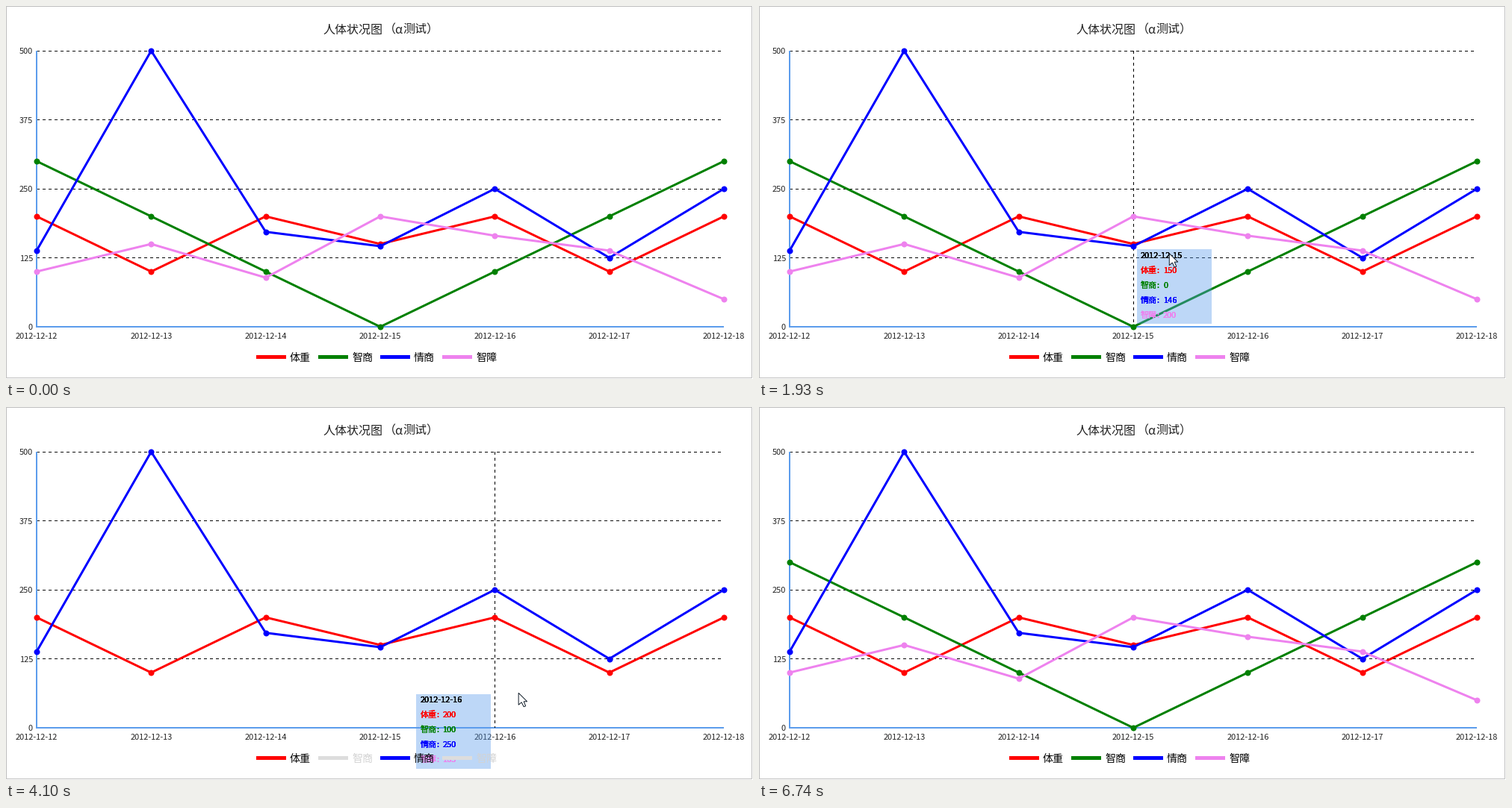
A matplotlib script for the animation above (7.08 s loop, 1000x500 px).

```python
import numpy as np
import matplotlib.pyplot as plt
from matplotlib.animation import FuncAnimation
from matplotlib.patches import Polygon, Rectangle

W, H, DPI = 1000, 500, 100
LOOP, STEP = 7080, 30
PT = 72 / DPI
LEFT, RIGHT, TOP, BOTTOM = 41, 961, 60, 430
ITEM_X, ITEM_GAP, ITEM_Y = 335, 83, 470.5
AXIS, PALE, INK = "#5c9cec", "#dddddd", "#14202c"
FONT = "Noto Sans CJK JP"

days = [f"2012-12-{d}" for d in range(12, 19)]
day_x = np.linspace(LEFT, RIGHT, 7)
series = [
    ("体重", "red", [200, 100, 200, 150, 200, 100, 200]),
    ("智商", "green", [300, 200, 100, 0, 100, 200, 300]),
    ("情商", "blue", [138, 500, 172, 146, 250, 125, 250]),
    ("智障", "violet", [100, 150, 89, 200, 165, 138, 50]),
]


def item(k):
    """Pointer spot on a legend entry."""
    return ITEM_X + ITEM_GAP * k + 18, 472


# pointer moves: start, end, destination; it rests in between
ENTRY = (222, 490)
moves = [
    (190, 390, (327, 235)),
    (710, 1250, (682, 150)),
    (1410, 1449, (649, 188)),
    (1449, 1929, (554, 326)),
    (1929, 2090, (427, 477)),
    (2190, 2520, item(1)),
    (2700, 3190, (647, 482)),
    (3310, 3410, (635, 476)),
    (3560, 3850, (655, 395)),
    (4050, 4300, (828, 330)),
    (4300, 4610, item(3)),
    (4910, 5320, item(1)),
    (6220, 6730, (219, 500)),
]
HIDDEN = {1: (2700, 5750), 3: (3560, 4910)}
TIP_OFF = 4520
LAG = 6

fig = plt.figure(figsize=(W / DPI, H / DPI), dpi=DPI, facecolor="white")
ax = fig.add_axes([0, 0, 1, 1])
ax.set_xlim(0, W)
ax.set_ylim(H, 0)
ax.axis("off")


def value_y(v):
    return BOTTOM - np.asarray(v) * (BOTTOM - TOP) / 500


def label(x, y, s, px, color="#222222", ha="left", z=1):
    """Text whose middle height is y."""
    return ax.text(x, y + 0.37 * px, s, fontsize=px * PT, color=color, ha=ha,
                   va="baseline", family=FONT, zorder=z)


def stroke(xs, ys, color, px, z, **kw):
    kw.setdefault("solid_capstyle", "butt")
    return ax.plot(xs, ys, color=color, lw=px * PT, zorder=z, snap=False,
                   **kw)[0]


def crisp(v):
    """Centre of the pixel that holds v."""
    return np.floor(v) + 0.5


def dashed(xs, ys, z):
    return stroke(xs, ys, "black", 1, z, dashes=(4, 4), dash_capstyle="butt")


# border, title, grid and axes
ax.add_patch(Rectangle((0.5, 0.5), 998, 498, fill=False, ec="#bebebe",
                       lw=PT, zorder=9, snap=False))
label(424, 31, "人体状况图", 16)
label(506, 31, "（", 16)
label(525.5, 31, "α", 16, ha="center")
label(531, 31, "测试）", 16)
for v in range(0, 501, 125):
    y = float(value_y(v))
    label(36, y, str(v), 11, ha="right")
    if v:
        dashed([LEFT, RIGHT], [crisp(y)] * 2, 1)
for x, day in zip(day_x, days):
    label(x, 442, day, 11, ha="center")
stroke([LEFT, LEFT, RIGHT], [TOP, BOTTOM, BOTTOM], AXIS, 2, 2,
       solid_joinstyle="miter")

# series and legend
curves, swatches, names = [], [], []
for k, (name, color, vals) in enumerate(series):
    curves.append(stroke(day_x, value_y(vals), color, 3, 3 + k / 10,
                         marker="o", ms=8 * PT, mew=0,
                         solid_joinstyle="round"))
    x = ITEM_X + ITEM_GAP * k
    swatch = Rectangle((x, ITEM_Y - 2.5), 40, 5, fc=color, lw=0, zorder=6)
    swatches.append(ax.add_patch(swatch))
    names.append(label(x + 45, ITEM_Y + 0.5, name, 14, "black", z=6))

# hover guide and tooltip
guide = dashed([LEFT, LEFT], [TOP, BOTTOM], 2.5)
box = ax.add_patch(Rectangle((0, 0), 100, 100, fc=AXIS, alpha=0.4, lw=0,
                             zorder=5))


def heavy(s, color):
    """Overprinted copies of a text, for bolder edges."""
    return [label(0, 0, s, 11, color, z=5.5) for _ in range(4)]


def place(copies, x, y, s=None):
    for t in copies:
        t.set_position((x, y + 0.37 * 11))
        t.set_visible(y < H + 8)
        if s is not None:
            t.set_text(s)


heading = heavy("", "black")
rows = [(heavy(n, c), heavy(":", c), heavy("", c)) for n, c, _ in series]
tip_parts = [guide, box] + heading + [t for r in rows for g in r for t in g]

# pointers, relative to their hot spot
ARROW = np.array([(0, 0), (0, 16), (4, 12.5), (7, 18.5), (9.5, 17.5),
                  (7, 11.5), (11.5, 11.5)])
HAND = np.array([(0, 0), (2, 0), (3, 6), (9, 7), (12, 9), (13, 15), (11, 19),
                 (11, 23), (1, 23), (1, 21), (-5, 12), (-4, 10), (-1, 13),
                 (-1, 1)])
pointer = ax.add_patch(Polygon(ARROW, fc="white", ec=INK, lw=PT, zorder=10))
knuckles = [stroke([], [], INK, 1, 10.1) for _ in range(3)]


def pointer_at(t):
    pos = np.array(ENTRY, float)
    for start, end, goal in moves:
        pos += (goal - pos) * np.clip((t - start) / (end - start), 0, 1)
    return pos


def frame_time(i):
    return (i + 0.5) * STEP


def hover_states():
    """Tooltip anchor per frame; it parks on the axis when the pointer leaves."""
    states, spot = [], None
    for i in range(LOOP // STEP):
        t = frame_time(i)
        x, y = pointer_at(t - LAG)
        if moves[0][0] < t and TOP <= y <= BOTTOM:
            spot = x, y
        elif spot:
            spot = spot[0], BOTTOM
        states.append(spot if t < TIP_OFF else None)
    return states


hovers = hover_states()


def draw_tip(spot):
    for part in tip_parts:
        part.set_visible(spot is not None)
    if spot is None:
        return
    x, y = spot
    n = int(np.argmin(abs(day_x - x)))
    gx = day_x[n]
    bx = gx + 5 if gx <= W / 2 + 1 else gx - 105
    guide.set_xdata([crisp(gx)] * 2)
    box.set_xy((bx, y))
    box.set_height(min(100, H - 1 - y))
    place(heading, bx + 5, y + 7.5, days[n])
    for k, (name, colon, num) in enumerate(rows):
        ty = y + 27.5 + 20 * k
        place(name, bx + 5, ty)
        place(colon, bx + 26.5, ty)
        place(num, bx + 35, ty, str(series[k][2][n]))


def draw_pointer(t):
    shown = moves[0][0] <= t < moves[-1][1]
    x, y = pointer_at(t)
    on_item = abs(y - ITEM_Y) < 8 and any(
        0 <= x - ITEM_X - ITEM_GAP * k <= 74 for k in range(4))
    pointer.set_visible(shown)
    pointer.set_xy((x, y) + (HAND if on_item else ARROW))
    for k, line in enumerate(knuckles, 1):
        line.set_visible(shown and on_item)
        line.set_data([x + 3 * k] * 2, [y + 6, y + 11])


def update(i):
    t = frame_time(i)
    for k, (_, color, _) in enumerate(series):
        start, end = HIDDEN.get(k, (LOOP, LOOP))
        off = start <= t < end
        curves[k].set_visible(not off)
        swatches[k].set_facecolor(PALE if off else color)
        names[k].set_color("#d3d3d3" if off else "black")
    draw_tip(hovers[i])
    draw_pointer(t)
    return []


anim = FuncAnimation(fig, update, frames=LOOP // STEP, interval=STEP,
                     init_func=lambda: update(0), repeat=True, repeat_delay=0)
plt.show()
```
